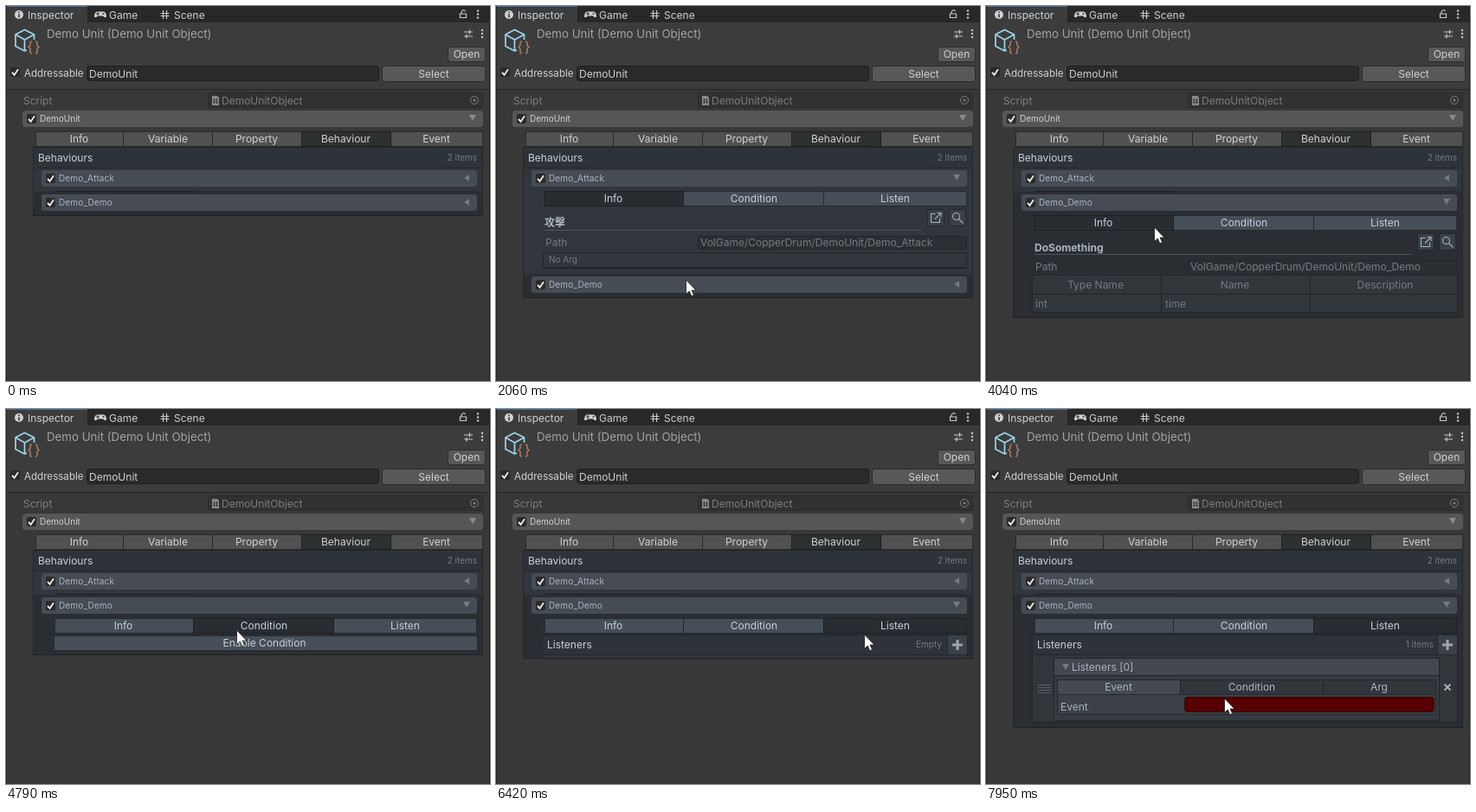
An HTML page that plays this animation: 559x434 px, repeating every 8 s.

```html
<!DOCTYPE html>
<html lang="en">
<head>
<meta charset="utf-8">
<title>Inspector</title>
<style>
html, body { margin: 0; width: 100%; height: 100%; overflow: hidden; background: #383838; }
svg { display: block; }
text { font: 12px Inter, "Noto Sans CJK TC", "Noto Sans CJK SC", sans-serif; fill: #d0d0d0; white-space: pre; }
.s { font-size: 10px; }
.name { letter-spacing: .15px; }
.b { font-weight: 700; }
.m { text-anchor: middle; }
.e { text-anchor: end; }
.dim { fill: #7d7d7d; }
.cool { fill: #a9b4be; }
.off { fill: #737a81; }
.lite { fill: #c6d0da; }
.btn { fill: #585858; stroke: #2c2c2c; }
.tab { fill: #515151; stroke: #292929; }
.row { fill: #464c54; }
.icon { fill: #394047; stroke: #24282c; }
.itab { fill: #464e57; stroke: #262a2f; }
.sel { fill: #292d32; stroke: #1d2024; }
.field { fill: #2b2f34; stroke: #23272b; }
.cell { fill: #31363b; stroke: #22262a; }
.line { fill: none; stroke: #22262a; }

.a { animation: 8s step-end infinite; }
#cover { animation-name: cover; }
#lower { animation-name: lower; }
#mark { animation-name: mark; }
#info { animation-name: info; }
#cond { animation-name: cond; }
#listen { animation-name: listen; }
#cursor { animation-name: cursor; }
.open1 { animation-name: open1; }
.shut1 { animation-name: shut1; }
.open2 { animation-name: open2; }
.shut2 { animation-name: shut2; }
.full { animation-name: full; }
.empty { animation-name: empty; }

@keyframes open1 { 0%, 30%, 100% { opacity: 0 } 12.5% { opacity: 1 } 27.375% { opacity: 0 } }
@keyframes shut1 { 0%, 30%, 100% { opacity: 1 } 12.5% { opacity: 0 } 27.375% { opacity: 1 } }
@keyframes open2 { 0% { opacity: 0 } 27.375%, 100% { opacity: 1 } }
@keyframes shut2 { 0% { opacity: 1 } 27.375%, 100% { opacity: 0 } }
@keyframes full { 0% { opacity: 0 } 89.875%, 100% { opacity: 1 } }
@keyframes empty { 0% { opacity: 1 } 89.875%, 100% { opacity: 0 } }
@keyframes mark {
  0% { x: 378.5px; width: 165px }
  40.375% { x: 56.5px; width: 160px }
  57.25% { x: 216.5px; width: 162px }
  73.5%, 100% { x: 378.5px; width: 165px }
}
@keyframes lower {
  0% { transform: translateY(0) }
  12.5% { transform: translateY(0); animation-timing-function: steps(4, start) }
  16.125% { transform: translateY(95px) }
  27.375% { transform: translateY(95px); animation-timing-function: steps(3, start) }
  30%, 100% { transform: translateY(0) }
}
@keyframes cover {
  0% { transform: translateY(243px) }
  12.5% { transform: translateY(243px); animation-timing-function: steps(4, start) }
  16.125% { transform: translateY(338px) }
  27.375% { transform: translateY(338px); animation-timing-function: steps(3, start) }
  30% { transform: translateY(289px) }
  40.375% { transform: translateY(289px); animation-timing-function: steps(4, start) }
  43.875% { transform: translateY(361px) }
  57.25% { transform: translateY(361px); animation-timing-function: steps(4, start) }
  60.75% { transform: translateY(285px) }
  73.5% { transform: translateY(285px); animation-timing-function: steps(5, start) }
  77.875% { transform: translateY(289px) }
  89.875% { transform: translateY(298px) }
  90.75% { transform: translateY(298px); animation-timing-function: steps(3, start) }
  93.375%, 100% { transform: translateY(369px) }
}
@keyframes info {
  0% { transform: translateX(-492px) }
  40.375% { transform: translateX(-492px); animation-timing-function: steps(4, start) }
  43.875% { transform: translateX(0) }
  57.25% { transform: translateX(0); animation-timing-function: steps(4, start) }
  60.75%, 100% { transform: translateX(-492px) }
}
@keyframes cond {
  0% { transform: translateX(492px) }
  57.25% { transform: translateX(492px); animation-timing-function: steps(4, start) }
  60.75% { transform: translateX(0) }
  73.5% { transform: translateX(0); animation-timing-function: steps(5, start) }
  77.875%, 100% { transform: translateX(-492px) }
}
@keyframes listen {
  0% { transform: translateX(0) }
  40.375% { transform: translateX(0); animation-timing-function: steps(4, start) }
  43.875% { transform: translateX(492px) }
  73.5% { transform: translateX(492px); animation-timing-function: steps(5, start) }
  77.875%, 100% { transform: translateX(0) }
}
@keyframes cursor {
  0% { transform: translate(232px, 452px) }
  5% { transform: translate(232px, 452px); animation-timing-function: steps(6, start) }
  10.625% { transform: translate(268px, 177px); animation-timing-function: steps(3, start) }
  13.4375% { transform: translate(261px, 195px) }
  19.625% { transform: translate(261px, 195px); animation-timing-function: steps(8, start) }
  26.625% { transform: translate(220px, 317px) }
  33.25% { transform: translate(220px, 317px); animation-timing-function: steps(5, start) }
  37.625% { transform: translate(178px, 267px); animation-timing-function: steps(2, start) }
  39.375% { transform: translate(130px, 249px) }
  40.375% { transform: translate(130px, 249px); animation-timing-function: steps(4, start) }
  44.625% { transform: translate(169px, 253px) }
  47.875% { transform: translate(169px, 253px); animation-timing-function: steps(4, start) }
  51.3% { transform: translate(195px, 256px); animation-timing-function: steps(4, start) }
  54.725% { transform: translate(267px, 256px) }
  64% { transform: translate(267px, 256px); animation-timing-function: steps(9, start) }
  71.875% { transform: translate(449px, 254px) }
  73.5% { transform: translate(449px, 254px); animation-timing-function: steps(5, start) }
  77.875% { transform: translate(423px, 260px) }
  80.25% { transform: translate(426px, 261px) }
  81.125% { transform: translate(426px, 261px); animation-timing-function: steps(9, start) }
  89% { transform: translate(531px, 271px) }
  92.875% { transform: translate(531px, 271px); animation-timing-function: steps(8, start) }
  100% { transform: translate(276px, 335px) }
}
</style>
</head>
<body>
<svg width="559" height="434" viewBox="0 0 559 434">
  <defs>
    <clipPath id="pageClip"><path d="M53 261h492v180h-492z"/></clipPath>
    <g id="check">
      <rect x="1" y="1" width="11" height="11" rx="2" fill="#2a2a2a"/>
      <path d="M3 6.800l2.600 2.900L10 3.200" fill="none" stroke="#eee" stroke-width="1.800"/>
    </g>
    <path id="left" d="M6 0v8L0 4z" fill="#747a81"/>
    <path id="down" d="M0 0h8L4 7z" fill="#747a81"/>
    <g id="tabs">
      <path class="itab" d="M56.500 242.500h487v17h-487zM216.500 242.500v17M378.500 242.500v17"/>
    </g>
    <g id="tabText" class="m">
      <text class="lite" x="135.500" y="255">Info</text>
      <text class="lite" x="298" y="255">Condition</text>
      <text class="lite" x="461" y="255">Listen</text>
    </g>
    <g id="details">
      <path d="M56 287.500h435" stroke="#50565d"/>
      <rect class="icon" x="498.500" y="263.500" width="19" height="19" rx="2"/>
      <rect class="icon" x="523.500" y="263.500" width="19" height="19" rx="2"/>
      <g fill="none" stroke="#a9b2ba" stroke-width="1.100">
        <path d="M507.500 268.500h-5v10h10v-5M509.500 267.500h4.500v4.500M514 267.500l-7 7"/>
        <circle cx="531.500" cy="271.500" r="4"/><path d="M534.500 274.500l5 5"/>
      </g>
      <text class="off" x="57" y="306">Path</text>
      <rect class="field" x="233.500" y="294.500" width="310" height="15" rx="2"/>
    </g>
  </defs>

  <!-- window and header -->
  <path fill="#383838" d="M0 0h559v434H0z"/>
  <path fill="#282828" d="M0 0h559v19H0z"/>
  <path fill="#3c3c3c" d="M0 19h559v78H0zM1 1h93v18H1z"/>
  <path fill="#3a6ea5" d="M1 0h93v1H1z"/>
  <path fill="#242424" d="M0 96h559v1H0zM0 0h1v434H0zM558 0h1v434h-1zM94 0h1v19h-1z"/>
  <circle cx="15" cy="10" r="5" fill="#d0d0d0"/>
  <path d="M15 6.500v1.500M15 9.200v4" stroke="#333" stroke-width="1.600"/>
  <text x="25" y="15">Inspector</text>
  <path d="M105 6.500h8q3 1 3 6-1.500 2-4-1h-6q-2.500 3-4 1 0-5 3-6z" fill="#d0d0d0"/>
  <path d="M104 9h4M106 7v4" stroke="#333"/><circle cx="112.500" cy="9" r="1" fill="#333"/>
  <text x="119" y="15">Game</text>
  <path d="M181.500 5v10M185.500 5v10M178.500 8.500h10M178.500 11.500h10" stroke="#c8c8c8" stroke-width="1.200"/>
  <text x="194" y="15">Scene</text>
  <path d="M524.500 9h7v4.500h-7zM526 9V7q2-4 4.500-1" fill="none" stroke="#c8c8c8" stroke-width="1.200"/>
  <g fill="#c8c8c8">
    <circle cx="545" cy="5.500" r="1.200"/><circle cx="545" cy="9.500" r="1.200"/><circle cx="545" cy="13.500" r="1.200"/>
    <circle cx="550" cy="28" r="1.200"/><circle cx="550" cy="32" r="1.200"/><circle cx="550" cy="36" r="1.200"/>
  </g>
  <path d="M529 30h10M529 35h10M535.500 27.500v5M532 32.500v5" stroke="#c8c8c8" stroke-width="1.200"/>
  <path d="M24 51l-2.500 1-10.500-5.500V33l10.500-5.500L32.500 33v6M11 33l10.500 6 11-6M21.500 39v13" fill="none" stroke="#9bd5ea" stroke-width="1.700" stroke-linejoin="round"/>
  <path d="M30 41q-2 0-2 2v2.500l-2 2 2 2V53q0 2 2 2M34 41q2 0 2 2v2.500l2 2-2 2V53q0 2-2 2" fill="none" stroke="#a9785f" stroke-width="1.600"/>
  <text x="47" y="37" style="font-size:13.300px;fill:#a3a3a3">Demo Unit (Demo Unit Object)</text>
  <rect class="btn" x="510.500" y="47.500" width="43" height="17" rx="3"/>
  <text class="m" x="532" y="60">Open</text>
  <use href="#check" x="4" y="70"/>
  <text x="21" y="82" style="font-size:11.600px">Addressable</text>
  <rect x="93.500" y="69.500" width="337" height="17" rx="3" fill="#2a2a2a" stroke="#1f1f1f"/>
  <text x="96" y="83">DemoUnit</text>
  <rect class="btn" x="434.500" y="69.500" width="119" height="18" rx="3"/>
  <text class="m" x="494" y="83">Select</text>

  <!-- object body -->
  <text class="dim" x="20" y="114">Script</text>
  <rect x="233.500" y="100.500" width="317" height="17" rx="2" fill="#313131" stroke="#2b2b2b"/>
  <path d="M238 104h6l2 2v9h-8z" fill="#888"/>
  <path d="M240.500 107v6M243.500 107v6M239 109h6M239 111.500h6" stroke="#333" stroke-width=".8"/>
  <text class="dim" x="249" y="114">DemoUnitObject</text>
  <circle cx="541" cy="109" r="4.500" fill="none" stroke="#7d7d7d"/><circle cx="541" cy="109" r="1.500" fill="#7d7d7d"/>
  <rect x="19" y="121" width="532" height="19" rx="4" fill="#565656"/>
  <use href="#check" x="23" y="124"/>
  <text class="s" x="39" y="134">DemoUnit</text>
  <path d="M535 126h8l-4 7z" fill="#8a8a8a"/>
  <path class="tab" d="M34.500 145.500h516v17h-516zM135.500 145.500v17M238.500 145.500v17M444.500 145.500v17"/>
  <path fill="#2d3030" stroke="#1e2020" d="M341.500 145.500h103v17h-103z"/>
  <g class="m">
    <text x="84.500" y="158">Info</text>
    <text x="187" y="158">Variable</text>
    <text x="289.500" y="158">Property</text>
    <text x="392.500" y="158">Behaviour</text>
    <text x="497" y="158">Event</text>
  </g>

  <!-- behaviour list -->
  <path fill="#31363c" d="M31 163h520v271H31z"/>
  <path fill="#2e3339" d="M31 164h520v23H31z"/>
  <path fill="#23272b" d="M31 163h520v1H31zM31 187h520v1H31z"/>
  <text x="37" y="180" class="lite">Behaviours</text>
  <text class="s e off" x="544" y="179">2 items</text>
  <rect class="row" x="41" y="190" width="503" height="19" rx="3"/>
  <use href="#check" x="45" y="193"/>
  <text class="s name cool" x="61" y="203">Demo_Attack</text>
  <use href="#left" class="a shut1" x="529" y="195"/>
  <use href="#down" class="a open1" x="528" y="195"/>
  <g transform="translate(0 -28)">
    <use href="#tabs"/>
    <path class="sel" d="M56.500 242.500h160v17h-160z"/>
    <use href="#tabText"/>
    <use href="#details"/>
    <text class="b cool" x="56" y="283">攻擊</text>
    <text class="off" x="236" y="306">VolGame/CopperDrum/DemoUnit/Demo_Attack</text>
    <rect class="cell" x="54.500" y="313.500" width="489" height="17" rx="2"/>
    <text class="s off" x="61" y="325">No Arg</text>
    <path d="M53 331.500h492" stroke="#1f2327"/>
  </g>

  <g id="lower" class="a">
    <path fill="#2a2e33" d="M31 215h520v230H31z"/>
    <rect class="row" x="41" y="218" width="503" height="19" rx="3"/>
    <use href="#check" x="45" y="221"/>
    <text class="s name cool" x="61" y="231">Demo_Demo</text>
    <use href="#left" class="a shut2" x="529" y="223"/>
    <use href="#down" class="a open2" x="528" y="223"/>
    <use href="#tabs"/>
    <rect id="mark" class="a sel" x="378.500" y="242.500" width="165" height="17"/>
    <use href="#tabText"/>

    <g clip-path="url(#pageClip)">
      <g id="info" class="a">
        <use href="#details"/>
        <text class="b cool" x="56" y="284">DoSomething</text>
        <text class="off" x="236" y="306">VolGame/CopperDrum/DemoUnit/Demo_Demo</text>
        <path class="cell" d="M53.500 311.500h491v43h-491z"/>
        <path class="line" d="M53 333.500h492M202.500 311v44M374.500 311v44"/>
        <g class="m">
          <text class="off" x="126.500" y="327">Type Name</text>
          <text class="off" x="287.500" y="327">Name</text>
          <text class="off" x="461" y="327">Description</text>
        </g>
        <text class="off" x="57" y="349">int</text>
        <text class="off" x="207" y="349">time</text>
      </g>
      <g id="cond" class="a">
        <rect class="itab" x="55.500" y="262.500" width="489" height="17" rx="2"/>
        <text class="lite m" x="298.500" y="275">Enable Condition</text>
      </g>
      <g id="listen" class="a">
        <path class="cell" d="M53.500 261.500h491v101h-491z"/>
        <path class="line" d="M53 284.500h492M521.500 262v22"/>
        <path fill="#2e3339" d="M54 262h467v22H54z"/>
        <path fill="#3a4149" d="M522 262h22v22h-22z"/>
        <text class="lite" x="59" y="277">Listeners</text>
        <text class="a empty s e off" x="515" y="276">Empty</text>
        <text class="a full s e off" x="517" y="276">1 items</text>
        <path d="M527 273h12M533 267v12" stroke="#9da5ad" stroke-width="3"/>
        <g class="a full">
          <path d="M60 319.500h15M60 322.500h15M60 325.500h15M60 328.500h15" stroke="#596067"/>
          <path d="M529.500 318.500l7 7M536.500 318.500l-7 7" stroke="#aab1b8" stroke-width="1.800"/>
          <path fill="#363b41" stroke="#22262a" d="M78.500 288.500h445v72h-445z"/>
          <path fill="#42484f" d="M79 289h444v19H79z"/>
          <path class="line" d="M79 308.500h444"/>
          <use href="#down" x="88" y="295"/>
          <text class="cool" x="99" y="303">Listeners [0]</text>
          <path fill="#31363b" stroke="#22262a" d="M82.500 313.500h437v17h-437zM389.500 313.500v17"/>
          <path fill="#424950" stroke="#22262a" d="M82.500 313.500h142v17h-142z"/>
          <path fill="#3b4147" stroke="#262a2e" d="M82.500 330.500h437v23h-437z"/>
          <g class="m">
            <text class="cool" x="153" y="326">Event</text>
            <text class="cool" x="307" y="326">Condition</text>
            <text class="cool" x="454" y="326">Arg</text>
          </g>
          <text class="cool" x="86" y="349">Event</text>
          <rect x="229.500" y="333.500" width="288" height="17" rx="3" fill="#560000" stroke="#2b0a0a"/>
        </g>
      </g>
    </g>
  </g>

  <path d="M31.500 163v271M550.500 163v271" stroke="#23272b"/>
  <g id="cover" class="a">
    <path fill="#383838" d="M31 0h520v440H31z"/>
    <path fill="#1f2327" d="M31-1h520v1H31z"/>
  </g>
  <path id="cursor" class="a" d="M-.5 0v16.500l3.800-3.500 2.500 5.700 2.700-1.200L6 12h5z" fill="#fff" stroke="#1c1c1c" stroke-width=".8"/>
</svg>
</body>
</html>
```
